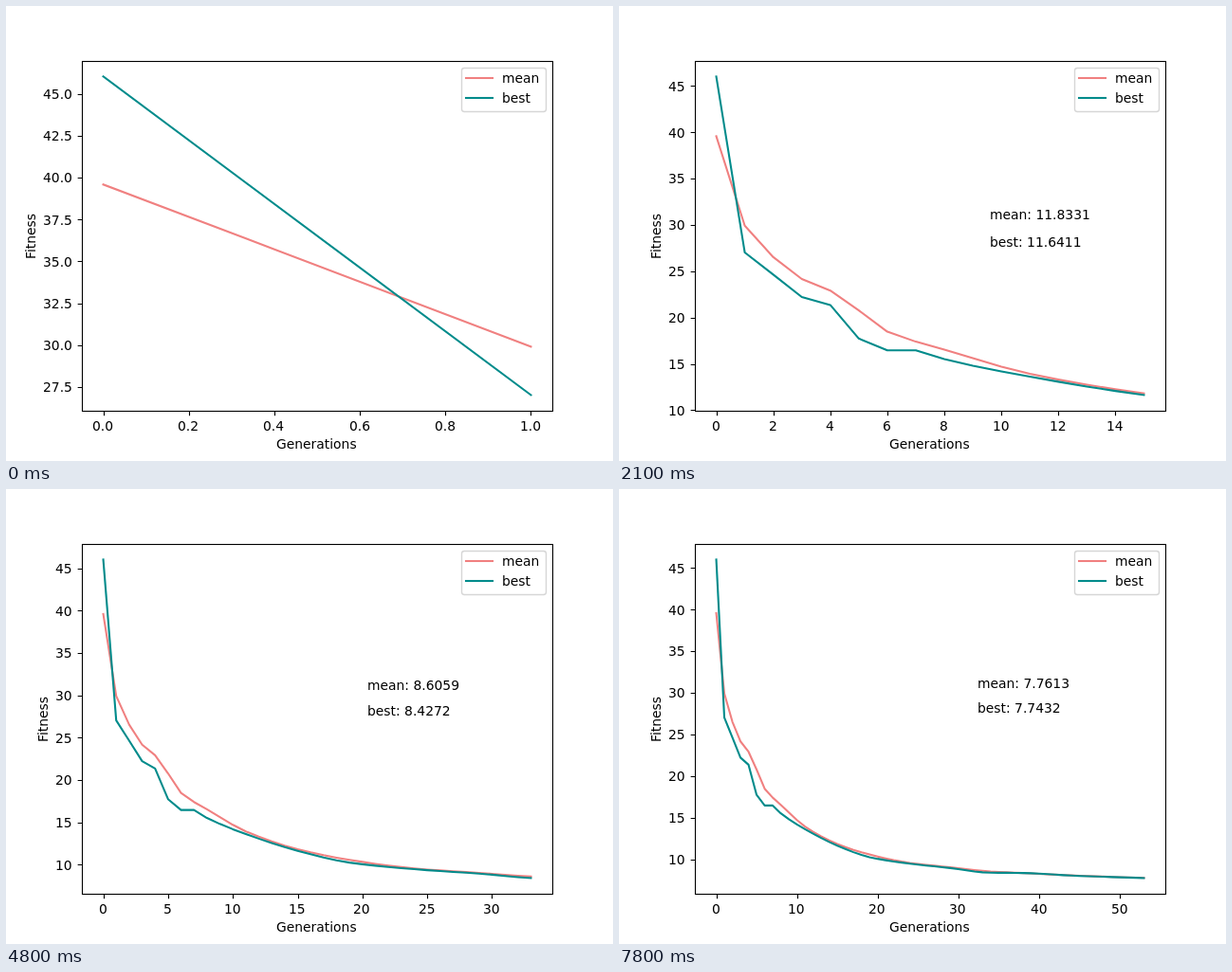
Animation of 640x480 px, one loop 8 s. Source, as an HTML page:

```html
<!DOCTYPE html>
<html lang="en">
<head>
<meta charset="utf-8">
<title>Fitness by generation</title>
<style>
  html, body { margin: 0; width: 100%; height: 100%; overflow: hidden; background: #fff; }
  svg { display: block; width: 640px; height: 480px; }
  text { font: 13.889px "DejaVu Sans", sans-serif; fill: #000; white-space: pre; }
  .axis { fill: none; stroke: #000; stroke-width: 1.11; }
  .curve { fill: none; stroke-width: 2.083; stroke-linecap: square; stroke-linejoin: round; }
  .mean { stroke: #f08080; }
  .best { stroke: #008b8b; }
</style>
</head>
<body>
<svg viewBox="0 0 640 480">
  <rect width="640" height="480" fill="#fff"/>
  <path id="ticks" class="axis"/>
  <g id="labels"></g>
  <path id="meanLine" class="curve mean"/>
  <path id="bestLine" class="curve best"/>
  <rect class="axis" x="80.5" y="58.5" width="496" height="369"/>
  <text x="285" y="467">Generations</text>
  <text id="yTitle">Fitness</text>
  <text id="meanText"></text>
  <text id="bestText"></text>
  <rect x="480.5" y="65.5" width="89" height="46" rx="2.78" fill="#fff" fill-opacity=".8" stroke="#ccc" stroke-opacity=".8" stroke-width="1.39"/>
  <path class="curve mean" d="M485 76H513"/>
  <path class="curve best" d="M485 97H513"/>
  <text x="523" y="81">mean</text>
  <text x="523" y="102">best</text>
</svg>
<script>
// Key points: generation, mean, best. A smooth falling curve joins them.
const KEYS = [
  [0, 39.59, 46.03], [1, 29.92, 27.03], [2, 26.53, 24.64],
  [3, 24.17, 22.22], [4, 22.92, 21.36], [5, 20.78, 17.74],
  [6, 18.48, 16.4631], [7, 17.4008, 16.4631], [8, 16.54, 15.52],
  [11, 13.93, 13.62], [15, 11.8331, 11.6411], [19, 10.57, 10.25],
  [24, 9.56, 9.47], [29, 9.0315, 8.9469], [34, 8.53, 8.38],
  [37, 8.3929, 8.3661], [45, 8.0161, 7.9945], [53, 7.7613, 7.7432]];

const STEP = 300, LOOP = 8000;
const X0 = 102.545, W = 450.91, Y0 = 74.4, H = 336;
const $ = id => document.getElementById(id);
const snap = v => Math.floor(v + 0.5) + 0.5;
const pen = document.createElement("canvas").getContext("2d");
pen.font = '13.889px "DejaVu Sans", sans-serif';
const widthOf = s => pen.measureText(s).width;

// Monotone cubic through one column of KEYS, sampled at every generation.
function series(col) {
  const last = KEYS.length - 1;
  const rate = i => (KEYS[i + 1][col] - KEYS[i][col]) / (KEYS[i + 1][0] - KEYS[i][0]);
  const slope = i => {
    if (i === 0) return rate(0);
    if (i === last) return rate(last - 1);
    const a = rate(i - 1), b = rate(i);
    return a * b > 0 ? 2 * a * b / (a + b) : 0;
  };
  const out = [KEYS[0][col]];
  for (let i = 0; i < last; i++) {
    const from = KEYS[i][col], to = KEYS[i + 1][col], n = KEYS[i + 1][0] - KEYS[i][0];
    for (let k = 1; k <= n; k++) {
      const t = k / n, u = 1 - t;
      out.push(from * u * u * (1 + 2 * t) + to * t * t * (3 - 2 * t)
        + n * t * u * (slope(i) * u - slope(i + 1) * t));
    }
  }
  return out;
}
const mean = series(1), best = series(2);

// Round tick values inside the view, which pads the data by 5% on each side.
function ticks(lo, hi) {
  const pad = (hi - lo) * 0.05, from = lo - pad, to = hi + pad;
  const raw = (to - from) / 9;
  const unit = 10 ** Math.floor(Math.log10(raw));
  const step = [1, 2, 2.5, 5, 10].find(s => s * unit >= raw) * unit;
  const digits = step % 1 ? 1 : 0;
  const list = [];
  for (let k = Math.ceil(from / step); k * step <= to; k++) {
    list.push({ value: k * step, label: Math.abs(k * step).toFixed(digits) });
  }
  return { list, digits };
}

// Text starts on whole pixels; align is the share of its width left of x.
const label = (x, y, align, s) =>
  `<text x="${Math.floor(x - align * widthOf(s))}" y="${Math.round(y)}">${s}</text>`;

function note(id, x, y, s) {
  const el = $(id);
  el.setAttribute("x", Math.floor(x));
  el.setAttribute("y", Math.round(y));
  el.textContent = s;
}

function draw(gen) {
  const top = best[0], low = best[gen];
  const px = v => X0 + v / gen * W;
  const py = v => Y0 + (top - v) / (top - low) * H;
  const line = data => "M" + data.slice(0, gen + 1)
    .map((v, i) => px(i).toFixed(2) + " " + py(v).toFixed(2)).join("L");

  $("meanLine").setAttribute("d", line(mean));
  $("bestLine").setAttribute("d", line(best));

  const xs = ticks(0, gen), ys = ticks(low, top);
  let marks = "", texts = "";
  for (const t of xs.list) {
    const x = px(t.value);
    marks += `M${snap(x)} 427.5v4.86`;
    texts += label(x, 448, 0.5, t.label);
  }
  for (const t of ys.list) {
    const y = py(t.value);
    marks += `M80.5 ${snap(y)}h-4.86`;
    texts += label(70.3, y + 5.3, 1, t.label);
  }
  $("ticks").setAttribute("d", marks);
  $("labels").innerHTML = texts;
  $("yTitle").setAttribute("transform", `translate(${ys.digits ? 31 : 44} 267) rotate(-90)`);

  const x = px(0.6 * (gen + 1)), y = 0.6 * top;
  note("meanText", x, py(y + 3), "mean: " + mean[gen].toFixed(4));
  note("bestText", x, py(y), "best: " + best[gen].toFixed(4));
}

const start = performance.now();
let shown = 0;
function tick() {
  const gen = 1 + 2 * Math.floor((performance.now() - start) % LOOP / STEP);
  if (gen !== shown) draw(shown = gen);
  requestAnimationFrame(tick);
}
tick();
</script>
</body>
</html>
```
